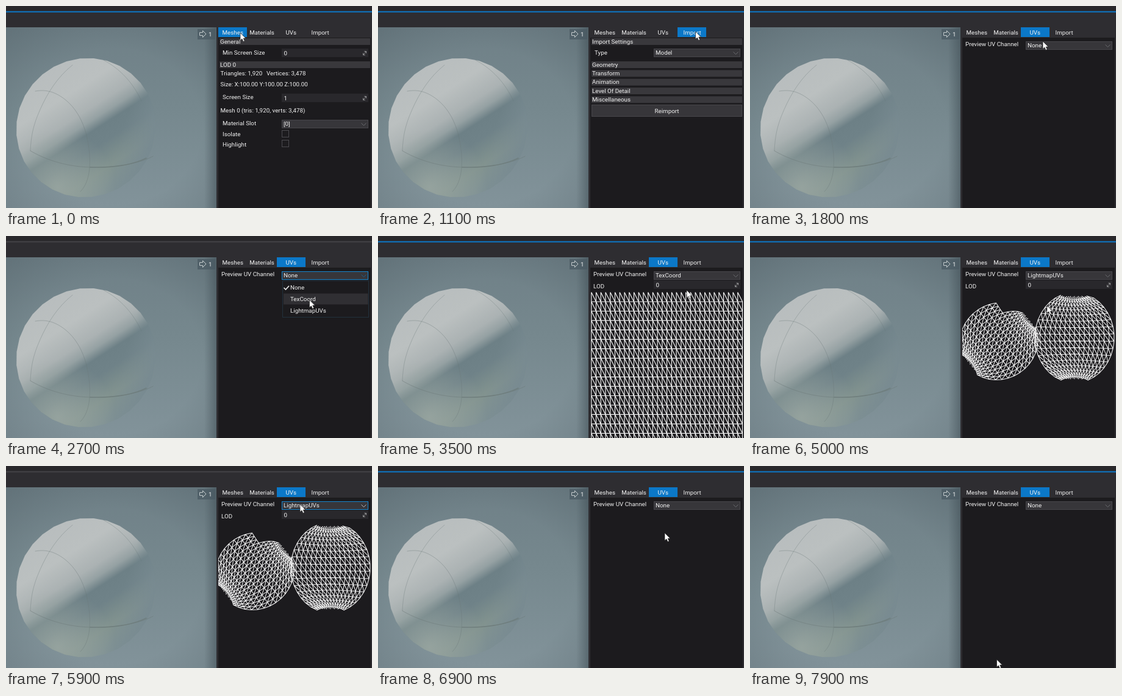
Animation of 600x332 px, one loop 8000 ms. Source, as an HTML page:

```html
<!DOCTYPE html>
<html lang="en">
<head>
<meta charset="utf-8">
<title>Model editor tabs</title>
<style>
  html, body { margin: 0; width: 100%; height: 100%; overflow: hidden; background: #2e2d31; }
  svg { display: block; width: 600px; height: 332px; }
  text { font: 9.8px Roboto, "Liberation Sans", sans-serif; fill: #f1f1f1; white-space: pre; }
  .seam { fill: none; stroke: #6c7978; stroke-linecap: round; }
  .wire { fill: none; stroke: #f4f4f4; stroke-linejoin: round; }
</style>
</head>
<body>
<svg id="stage" viewBox="0 0 600 332" xmlns="http://www.w3.org/2000/svg">
  <defs>
    <linearGradient id="sky" x1="0" y1="0" x2="0" y2="1">
      <stop offset="0" stop-color="#6f8087"/>
      <stop offset=".45" stop-color="#76888e"/>
      <stop offset="1" stop-color="#82939a"/>
    </linearGradient>
    <radialGradient id="vignette" cx=".5" cy=".55" r=".72">
      <stop offset=".6" stop-color="#3d4b52" stop-opacity="0"/>
      <stop offset="1" stop-color="#3d4b52" stop-opacity=".25"/>
    </radialGradient>
    <linearGradient id="edge">
      <stop offset="0" stop-color="#3d4b52" stop-opacity="0"/>
      <stop offset="1" stop-color="#3d4b52" stop-opacity=".5"/>
    </linearGradient>
    <linearGradient id="ball" gradientUnits="userSpaceOnUse" x1="76" y1="95" x2="198" y2="285">
      <stop offset="0" stop-color="#b8bdbe"/>
      <stop offset=".25" stop-color="#bbc0c0"/>
      <stop offset=".42" stop-color="#abb2b3"/>
      <stop offset=".5" stop-color="#95a1a3"/>
      <stop offset=".57" stop-color="#6d8086"/>
      <stop offset=".68" stop-color="#6f8288"/>
      <stop offset=".85" stop-color="#82938f"/>
      <stop offset="1" stop-color="#7f9194"/>
    </linearGradient>
    <radialGradient id="bounce" gradientUnits="userSpaceOnUse" cx="85" cy="298" r="95">
      <stop offset="0" stop-color="#98a5a0" stop-opacity=".9"/>
      <stop offset="1" stop-color="#98a5a0" stop-opacity="0"/>
    </radialGradient>
    <linearGradient id="fade" gradientUnits="userSpaceOnUse" x1="195" y1="190" x2="244" y2="205">
      <stop offset="0" stop-color="#788a91" stop-opacity="0"/>
      <stop offset="1" stop-color="#788a91" stop-opacity=".95"/>
    </linearGradient>
    <clipPath id="pane"><rect x="348" y="52" width="250" height="280"/></clipPath>
  </defs>
</svg>
<script>
const NS = 'http://www.w3.org/2000/svg';
const LOOP = 8000, STEP = 100;
const stage = document.getElementById('stage');

function add(parent, tag, attrs = {}, content) {
  const node = document.createElementNS(NS, tag);
  for (const key in attrs) node.setAttribute(key, attrs[key]);
  if (content !== undefined) node.textContent = content;
  parent.appendChild(node);
  return node;
}
const group = (parent, attrs) => add(parent, 'g', attrs);
const rect = (p, x, y, width, height, fill, extra) => add(p, 'rect', { x, y, width, height, fill, ...extra });
const text = (p, x, y, str, extra) => add(p, 'text', { x, y, ...extra }, str);
const path = (p, d, extra) => add(p, 'path', { d, fill: 'none', ...extra });
const show = (node, on) => node.setAttribute('visibility', on ? 'inherit' : 'hidden');

// Widgets
function bar(p, y, label) {
  rect(p, 350, y, 247, 11, '#39383c');
  text(p, 351, y + 8.7, label);
}
function field(p, y, value) {
  rect(p, 452, y, 142, 14, '#29282c');
  text(p, 455.5, y + 10.5, value);
  path(p, `M585.5 ${y + 10.5}l5 -6m-3.2 0h3.2v3.2m-5 -.4v3.2h3.2`, { stroke: '#a0a0a2', 'stroke-width': .9 });
}
function combo(p, y, value) {
  const box = rect(p, 452.5, y + .5, 141, 13, '#37363a', { stroke: '#47464b' });
  const label = text(p, 455, y + 10.4, value);
  const arrow = path(p, `M582.5 ${y + 5.5}l4 4l4 -4`, { stroke: '#69696d', 'stroke-width': 1 });
  return { box, label, arrow };
}
const check = (p, y) => rect(p, 452.5, y + .5, 11, 11, '#1d1c1f', { stroke: '#4b4a4f' });

// Window frame
rect(stage, 0, 0, 600, 332, '#2e2d31');
rect(stage, 0, 0, 600, 8, '#29282b');
const topLine = rect(stage, 0, 8.5, 600, 2, '#0b78c8');

// Viewport
const view = group(stage);
for (const fill of ['sky', 'vignette']) rect(view, 0, 35, 345, 297, `url(#${fill})`);
rect(view, 325, 35, 20, 297, 'url(#edge)');
// Slightly stretched towards the upper right
const rim = Array.from({ length: 32 }, (_, i) => {
  const a = (i + .5) * Math.PI / 16, u = 115.8 * Math.cos(a), v = 113 * Math.sin(a);
  return `${(131.2 + (u + v) * Math.SQRT1_2).toFixed(1)},${(200 + (v - u) * Math.SQRT1_2).toFixed(1)}`;
}).join(' ');
for (const fill of ['ball', 'bounce', 'fade']) add(view, 'polygon', { points: rim, fill: `url(#${fill})` });
[
  ['M109 97C84 117 68 143 56 170S41 215 40 238', .9, .4],
  ['M48 140C64 137 79 140 96 153C119 171 132 200 136 235C140 268 135 292 122 305', 1, .4],
  ['M40 238C62 251 96 264 138 265C180 266 218 259 241 247', 1, .5],
  ['M138 265C170 266 205 262 230 250', 1.4, .7],
  ['M160 89C187 103 209 127 222 156', .9, .4]
].forEach(([d, w, o]) => path(view, d, { class: 'seam', 'stroke-width': w, opacity: o }));
rect(view, 314, 38, 29, 17, '#4a5a63', { opacity: .75 });
path(view, 'M317.5 43.5h5v-3l5.500 5.500l-5.500 5.500v-3h-5z', { stroke: '#c3cacc', 'stroke-width': 1 });
text(view, 332, 50, '1', { fill: '#dde2e3' });

// Side panel
rect(stage, 348, 52, 250, 280, '#1c1b1e');
const tabNames = ['Meshes', 'Materials', 'UVs', 'Import'];
const tabWidth = 47.75;
const tabMark = rect(stage, 348, 35, 47, 16, '#0b78c8');
tabNames.forEach((name, i) =>
  text(stage, 371.8 + i * tabWidth, 46.5, name, { 'text-anchor': 'middle' }));
const pages = tabNames.map(() => group(stage, { 'clip-path': 'url(#pane)' }));
const [meshes, , uvs, imports] = pages;

bar(meshes, 53, 'General');
text(meshes, 355, 80, 'Min Screen Size');
field(meshes, 70, '0');
bar(meshes, 91, 'LOD 0');
text(meshes, 351.5, 114, 'Triangles: 1,920');
text(meshes, 427, 114, 'Vertices: 3,478');
text(meshes, 351.5, 132, 'Size: X:100.00 Y:100.00 Z:100.00');
text(meshes, 355, 153, 'Screen Size');
field(meshes, 144, '1');
text(meshes, 351.5, 175, 'Mesh 0 (tris: 1,920, verts: 3,478)');
text(meshes, 355, 195.5, 'Material Slot');
combo(meshes, 187, '[0]');
text(meshes, 355, 214, 'Isolate');
check(meshes, 204);
text(meshes, 355, 230.5, 'Highlight');
check(meshes, 220);

bar(imports, 53, 'Import Settings');
text(imports, 355, 80, 'Type');
combo(imports, 70, 'Model');
['Geometry', 'Transform', 'Animation', 'Level Of Detail', 'Miscellaneous']
  .forEach((name, i) => bar(imports, 91 + i * 14.35, name));
rect(imports, 350.5, 162.5, 246, 19, '#37363a', { stroke: '#47464b' });
text(imports, 473.5, 176, 'Reimport', { 'text-anchor': 'middle' });

text(uvs, 353, 66, 'Preview UV Channel');
const channelBox = combo(uvs, 58, 'None');
const lod = group(uvs);
text(lod, 353, 85.5, 'LOD');
field(lod, 73, '0');

// UV layouts: a triangulated grid, mapped point by point
function wire(cols, rows, map, keep = () => true) {
  const at = (i, j) => map(i, j).map(v => v.toFixed(1)).join(' ');
  let d = '';
  for (let j = 0; j < rows; j++)
    for (let i = 0; i < cols; i++)
      if (keep(i, j)) d += `M${at(i, j)}L${at(i, j + 1)}L${at(i + 1, j + 1)}${j ? 'L' + at(i + 1, j) : ''}${j ? 'L' + at(i, j) : 'M' + at(i, j)}L${at(i + 1, j + 1)}`;
  return d;
}
const texCoord = path(uvs, wire(32, 16, (i, j) => [349.8 + i * 7.74, 92.6 + j * 15.45]),
  { class: 'wire', 'stroke-width': 1.15 });

// Half of a sphere unrolled between its poles, turned by an angle
function shell(cx, cy, a, b, turn) {
  const cos = Math.cos(turn), sin = Math.sin(turn);
  return (i, j) => {
    const s = i / 8 - 1, phi = (j / 15 - .5) * 2.44;
    const x = a * s * Math.cos(phi);
    const y = b * Math.sin(phi) / .94 * (.92 + .08 * s * s);
    return [cx + x * cos - y * sin, cy + x * sin + y * cos];
  };
}
const lightmap = group(uvs, { class: 'wire', 'stroke-width': 1.05 });
const leftShell = shell(408, 173, 62, 62, .9);
const rightShell = shell(532, 167, 65, 70, 0);
path(lightmap, wire(16, 15, leftShell, (i, j) => i > 2 || j > 3));
path(lightmap, wire(16, 15, rightShell));
for (const map of [leftShell, rightShell])
  for (const [edge, inner] of [[0, 1], [15, 14]])
    for (let i = 3; i < 14; i++) {
      const [x, y] = map(i, edge), [u, v] = map(i, inner);
      const len = (2 + i * 7 % 3) / Math.hypot(x - u, y - v);
      path(lightmap, `M${x} ${y}l${(x - u) * len} ${(y - v) * len}`);
    }

// Drop-down list
const channels = ['None', 'TexCoord', 'LightmapUVs'];
const popup = group(stage);
rect(popup, 453.5, 73.5, 141, 60, '#1c1b1e', { stroke: '#22313d' });
const hoverRow = rect(popup, 455, 95, 138.5, 18, '#302f33');
channels.forEach((name, i) => text(popup, 466, 88 + i * 19, name));
const tick = path(popup, 'M455.5 85l3 3l5.500 -6', { stroke: '#e8e8e8', 'stroke-width': 1.7 });

const cursor = path(stage, 'M0 0V12.500L2.900 9.900L5 14.500L7.200 13.500L5.200 9.100H9Z',
  { fill: '#fff', stroke: '#222', 'stroke-width': .7 });

// Timeline
const tabSteps = [[0, 0], [200, 1], [600, 2], [900, 3], [1500, 2]];
const channelSteps = [[0, 0], [3100, 1], [4700, 2], [6400, 0]];
const focusSteps = [[0, 0], [2000, 1], [3100, 0], [4100, 1], [4700, 0], [5900, 1], [6400, 0]];
const popupSteps = [[0, 0], [2100, 1], [3100, 0], [4200, 1], [4700, 0], [6000, 1], [6400, 0]];
const moves = [
  [0, 384, 44], [200, 419, 45], [300, 419, 45], [600, 467, 43], [900, 518, 42], [1100, 520.5, 42],
  [1300, 510, 42], [1500, 468, 43], [1800, 480, 58], [2000, 492, 64], [2400, 494, 82], [2700, 497.5, 105],
  [3100, 499, 105], [3500, 506, 89], [3900, 490, 66], [4200, 488, 72], [4500, 487.5, 123], [4800, 487.5, 124],
  [5300, 486, 100], [5800, 482, 64], [5900, 482, 63], [6200, 478, 82], [6500, 477, 85], [6900, 470, 110],
  [7500, 415, 290], [7900, 404.5, 318], [8000, 404.5, 318]
];
const stepAt = (steps, t) => steps.filter(s => s[0] <= t).pop()[1];
function placeAt(t) {
  const n = moves.findIndex(m => m[0] > t);
  const [t0, x0, y0] = moves[n - 1], [t1, x1, y1] = moves[n];
  const k = (t - t0) / (t1 - t0);
  return [x0 + (x1 - x0) * k, y0 + (y1 - y0) * k];
}

function draw(t) {
  const tab = stepAt(tabSteps, t), channel = stepAt(channelSteps, t);
  const focus = stepAt(focusSteps, t), open = stepAt(popupSteps, t);
  const [x, y] = placeAt(t);

  tabMark.setAttribute('x', Math.round(348 + tab * tabWidth));
  pages.forEach((page, i) => show(page, i === tab));
  topLine.setAttribute('fill', focus ? '#434247' : '#0b78c8');
  channelBox.label.textContent = channels[channel];
  channelBox.box.setAttribute('stroke', focus ? '#1685cd' : '#47464b');
  channelBox.arrow.setAttribute('stroke', focus ? (open ? '#176092' : '#b8bbc0') : '#69696d');
  show(lod, channel > 0);
  show(texCoord, channel === 1);
  show(lightmap, channel === 2);

  show(popup, open);
  const row = Math.floor((y - 75) / 19);
  show(hoverRow, open && row >= 0 && row < 3);
  hoverRow.setAttribute('y', 75.5 + row * 19);
  tick.setAttribute('transform', `translate(0 ${channel * 19})`);
  cursor.setAttribute('transform', `translate(${x} ${y})`);
}

const start = performance.now();
function tickFrame() {
  const t = (performance.now() - start) % LOOP;
  draw(Math.floor(t / STEP) * STEP);
  requestAnimationFrame(tickFrame);
}
draw(0);
requestAnimationFrame(tickFrame);
</script>
</body>
</html>
```
